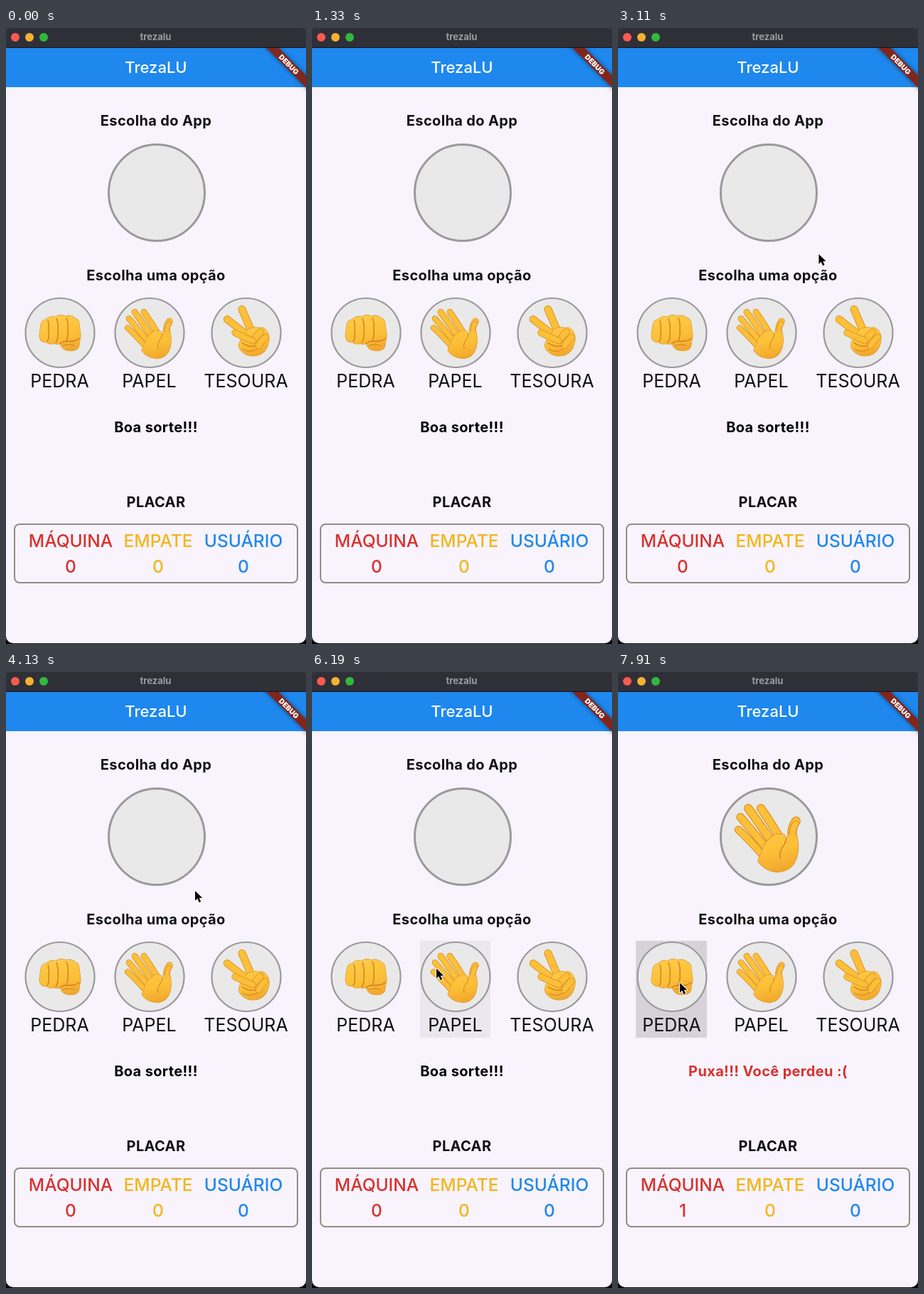
Animation, 422 px wide and 864 px high, one loop 8 s. Source, as an HTML page with a canvas:

```html
<!DOCTYPE html>
<html lang="pt-BR">
<head>
<meta charset="utf-8">
<title>trezalu</title>
<style>
html, body { margin: 0; width: 100%; height: 100%; overflow: hidden; background: #000; }
canvas { display: block; width: 422px; height: 864px; }
</style>
</head>
<body>
<canvas id="stage"></canvas>
<script>
const W = 422, H = 864, LOOP = 8000, RESULT_AT = 7600;
const FONT = 'Inter, "Open Sans", sans-serif';
const INK = '#101014', BLUE = '#1e88ee', RED = '#d8322e', AMBER = '#f2b61e';
const PAGE = '#f8f3fc', PLATE = '#e9e9e9', RING = '#9a999c';
const SKIN = '#fcbf38', EDGE = '#dc9128';

const canvas = document.getElementById('stage');
const dpr = window.devicePixelRatio || 1;
canvas.width = W * dpr;
canvas.height = H * dpr;
const ctx = canvas.getContext('2d');

// time, x, y of the pointer tip
const pointerPath = [
  [1500, 426, 190], [1990, 293, 323], [2500, 290, 322], [4130, 266, 307],
  [4700, 272, 325], [5300, 335, 425], [6190, 175, 416],
  [6930, 94, 438], [7400, 87, 436], [8000, 87, 436]
];

const options = [
  { label: 'PEDRA', cx: 76, tx: 75.5, left: 25, width: 100, draw: drawRock },
  { label: 'PAPEL', cx: 202, tx: 201.5, left: 152, width: 99, draw: drawPaper },
  { label: 'TESOURA', cx: 338, tx: 337.5, left: 278, width: 119, draw: drawScissors }
];

function text(str, x, y, size, weight, color, spacing = 0) {
  ctx.font = `${weight} ${size}px ${FONT}`;
  ctx.letterSpacing = spacing + 'px';
  ctx.textAlign = 'center';
  ctx.fillStyle = color;
  ctx.fillText(str, x, y);
}

const heading = (str, y, color = INK) => text(str, 211, y, 20, 700, color, 0.35);

function disc(x, y, r, fill, stroke, width) {
  ctx.beginPath();
  ctx.arc(x, y, r, 0, Math.PI * 2);
  ctx.fillStyle = fill;
  ctx.fill();
  if (stroke) {
    ctx.strokeStyle = stroke;
    ctx.lineWidth = width;
    ctx.stroke();
  }
}

function at(x, y, scale, draw) {
  ctx.save();
  ctx.translate(x, y);
  ctx.scale(scale, scale);
  ctx.lineCap = ctx.lineJoin = 'round';
  draw();
  ctx.restore();
}

function skin(top, bottom) {
  const g = ctx.createLinearGradient(-6, top, 6, bottom);
  g.addColorStop(0, '#ffca48');
  g.addColorStop(0.6, SKIN);
  g.addColorStop(1, '#f2a82e');
  return g;
}

// A rounded limb with a darker rim
function limb(path, width) {
  const p = new Path2D(path);
  ctx.strokeStyle = EDGE;
  ctx.lineWidth = width;
  ctx.stroke(p);
  ctx.strokeStyle = SKIN;
  ctx.lineWidth = width - 1.8;
  ctx.stroke(p);
}

function flesh(path, top, bottom) {
  const p = new Path2D(path);
  ctx.strokeStyle = EDGE;
  ctx.lineWidth = 1.2;
  ctx.stroke(p);
  ctx.fillStyle = skin(top, bottom);
  ctx.fill(p);
}

function crease(path, width = 1.3) {
  ctx.strokeStyle = '#c87c1c';
  ctx.lineWidth = width;
  ctx.stroke(new Path2D(path));
}

function drawRock() {
  flesh('M-27 -11 Q-26 -18 -19 -19 Q-13 -25 -6 -22 Q0 -27 8 -23 Q14 -26 21 -21 Q27 -19 27 -11 ' +
    'L29 3 Q29 9 27 13 Q28 23 18 25 Q6 26 2 19 L0 15 Q-4 17 -8 15 Q-15 17 -19 13 Q-28 14 -29 4 Z', -25, 25);
  crease('M-17 -17 Q-15 -10 -16 0 Q-15 8 -18 12');
  crease('M-5 -20 Q-2 -12 -3 -2 Q-2 8 -6 14');
  crease('M9 -21 Q12 -14 11 -4 Q12 4 9 11');
  crease('M0 15 Q4 11 14 12 Q22 12 27 8');
  crease('M4 18 Q12 15 20 18', 0.9);
}

function drawPaper() {
  limb('M28 -16 Q23 -9 24 0 L24 14', 9.5);
  limb('M-31 -7 Q-20 3 -5 20', 8.2);
  limb('M-29 -20 Q-17 -6 -3 11', 8.6);
  limb('M-21 -29 Q-10 -14 3 5', 9);
  limb('M-8 -29 Q2 -15 12 2', 9);
  flesh('M16 -2 Q20 7 20 -4 L28 -5 Q32 10 29 20 Q25 35 10 36 Q-3 36 -11 25 L-8 17 Q-6 13 -5 9 ' +
    'Q-2 5 0 3 Q4 -1 8 -3 Z', -14, 36);
  limb('M27.5 -13 Q24 -8 24.5 0', 7.5);
  ctx.fillStyle = SKIN;
  ctx.fillRect(20.5, -2, 8, 11);
  crease('M18 1 Q18 5 16 8 Q10 15 12 22', 0.9);
}

function drawScissors() {
  limb('M-27 -19 L5 6', 10.5);
  limb('M-6 -33 L9 2', 11);
  flesh('M1 -4 Q10 -9 17 -7 Q25 -9 29 -2 Q34 5 31 15 Q28 28 15 32 Q2 34 -6 26 Q-13 20 -9 12 ' +
    'Q-7 7 -2 4 Z', -10, 33);
  limb('M20 -1 Q14 4 10 11', 10);
  limb('M27 6 Q22 11 17 18', 9.5);
  limb('M-16 0 Q-4 6 9 11', 9.5);
  crease('M-6 14 Q4 21 14 18');
  crease('M-5 23 Q4 29 15 23', 0.9);
}

function drawPointer([x, y]) {
  const arrow = new Path2D('M0 0 L0 15 L3.5 11.8 L6.1 17.6 L8.9 16.4 L6.3 10.8 L11 10.5 Z');
  at(x, y, 0.92, () => {
    ctx.strokeStyle = '#fff';
    ctx.lineWidth = 2;
    ctx.stroke(arrow);
    ctx.fillStyle = '#000';
    ctx.fill(arrow);
  });
}

function pointerAt(t) {
  const i = pointerPath.findIndex(k => k[0] > t);
  if (i < 1) return null;
  const [t0, x0, y0] = pointerPath[i - 1], [t1, x1, y1] = pointerPath[i];
  const u = (t - t0) / (t1 - t0), e = u * u * (3 - 2 * u);
  return [x0 + (x1 - x0) * e, y0 + (y1 - y0) * e];
}

function drawBanner() {
  ctx.save();
  ctx.beginPath();
  ctx.rect(0, 28, W, 100);
  ctx.clip();
  ctx.translate(W, 27);
  ctx.rotate(Math.PI / 4);
  ctx.shadowColor = 'rgba(0,0,0,.5)';
  ctx.shadowBlur = 6 * dpr;
  ctx.fillStyle = '#82261c';
  ctx.fillRect(-45, 28, 90, 12);
  ctx.shadowColor = 'transparent';
  text('DEBUG', 0, 37.7, 10, 900, '#fff');
  ctx.restore();
}

function drawChrome() {
  ctx.fillStyle = '#2f2f37';
  ctx.fillRect(0, 0, W, 27);
  ctx.fillStyle = '#15151b';
  ctx.fillRect(0, 27, W, 1);
  ['#fb5a50', '#f2b232', '#30b83e'].forEach((c, i) => disc(13 + 20 * i, 13, 6, c));
  text('trezalu', 210.5, 17, 13, 700, '#9b9ba0');
  ctx.fillStyle = BLUE;
  ctx.fillRect(0, 28, W, 55);
  text('TrezaLU', 211, 63, 22, 500, '#fff');
  drawBanner();
}

function drawOption(o, tip, done) {
  const over = tip && tip[0] >= o.left && tip[0] <= o.left + o.width && tip[1] >= 377 && tip[1] <= 513;
  if (over) {
    ctx.fillStyle = done ? '#d7d2da' : '#ece7ef';
    ctx.fillRect(o.left, 377, o.width, 136);
  }
  disc(o.cx, 427.5, 48.5, PLATE, RING, 2.2);
  at(o.cx, 427.5, 1, o.draw);
  text(o.label, o.tx, 504, 25, 400, INK);
}

function drawScore(label, value, x, color) {
  text(label, x, 728, 24.5, 500, color);
  text(value, x, 764, 24.5, 500, color);
}

function render(t) {
  const done = t >= RESULT_AT, tip = pointerAt(t);
  ctx.setTransform(dpr, 0, 0, dpr, 0, 0);
  ctx.fillStyle = '#000';
  ctx.fillRect(0, 0, W, H);
  ctx.save();
  ctx.beginPath();
  ctx.roundRect(0, 0, W, H - 1, [4, 4, 10, 10]);
  ctx.clip();
  ctx.fillStyle = PAGE;
  ctx.fillRect(0, 0, W, H);
  drawChrome();

  heading('Escolha do App', 137);
  disc(212, 231, 67.5, PLATE, RING, 3);
  if (done) at(212, 231, 1.37, drawPaper);

  heading('Escolha uma opção', 354);
  options.forEach(o => drawOption(o, tip, done));

  if (done) heading('Puxa!!! Você perdeu :(', 567, RED);
  else heading('Boa sorte!!!', 567, '#000');

  heading('PLACAR', 672);
  ctx.beginPath();
  ctx.roundRect(12, 696, 398, 82, 7);
  ctx.strokeStyle = '#908e84';
  ctx.lineWidth = 2;
  ctx.stroke();
  drawScore('MÁQUINA', done ? '1' : '0', 91, RED);
  drawScore('EMPATE', '0', 214, AMBER);
  drawScore('USUÁRIO', '0', 334, BLUE);

  if (tip) drawPointer(tip);
  ctx.restore();
}

const start = performance.now();
function tick() {
  render((performance.now() - start) % LOOP);
  requestAnimationFrame(tick);
}
tick();
</script>
</body>
</html>
```
